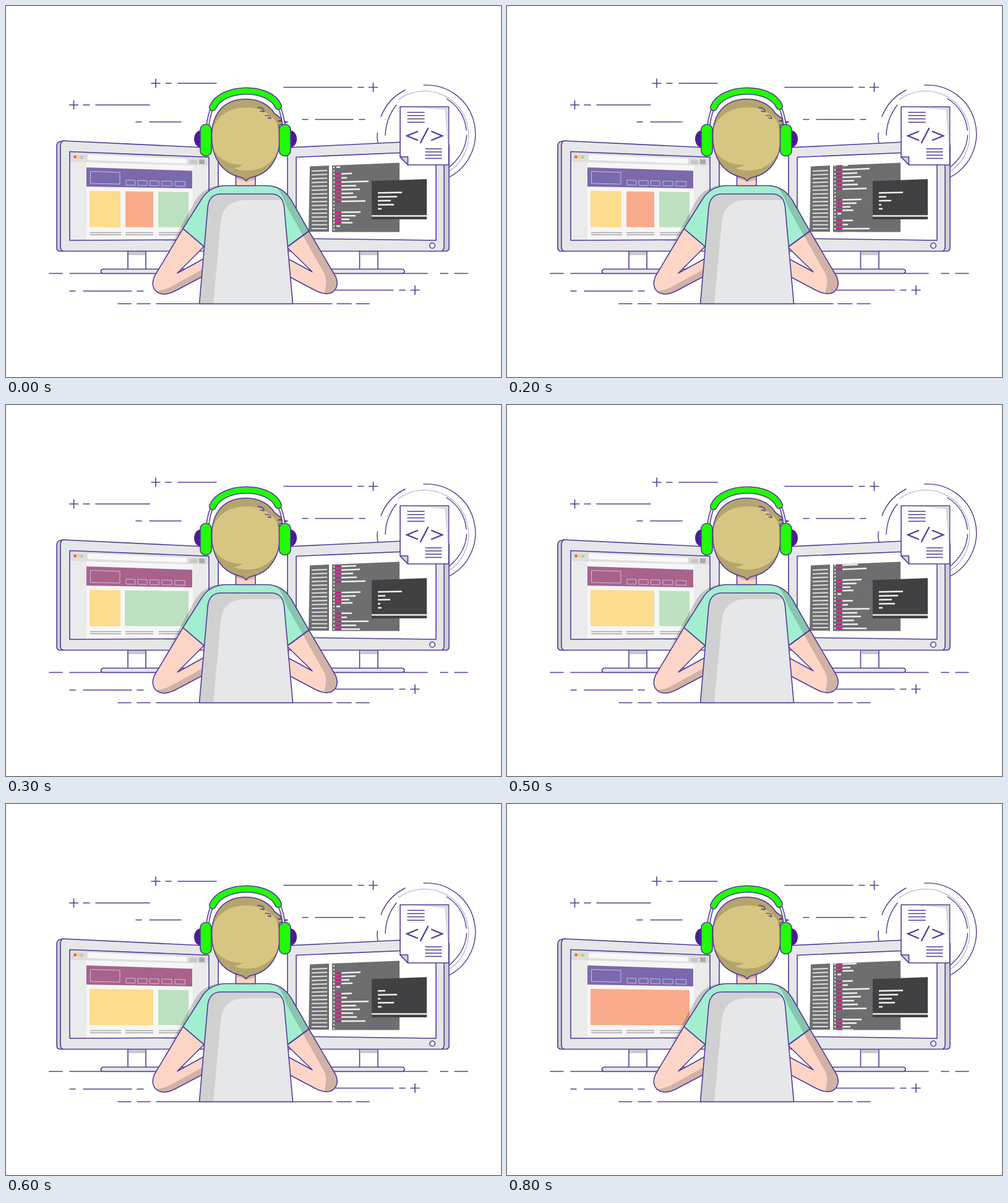
These frames come from a looping animation (800 px wide and 600 px high, 900 ms). An HTML page:

```html
<!DOCTYPE html>
<html lang="en">
<head>
<meta charset="utf-8">
<title>Developer at work</title>
<style>
  html, body { margin: 0; width: 100%; height: 100%; overflow: hidden; background: #fff; }
  svg { display: block; width: 100%; height: 100%; }
  .ink { stroke: #503c98; stroke-width: 1.6; stroke-linejoin: round; stroke-linecap: round; }
  .line { fill: none; }
  .case { fill: #e6e7e9; }
  .side { fill: #d0d0d5; }
  .skin { fill: #fcd5c7; }
  .shirt { fill: #a2eed0; }
  .green { fill: #22fb05; }
  .shade { fill: #000; fill-opacity: .17; }
</style>
</head>
<body>
<svg viewBox="0 0 800 600">
  <defs>
    <path id="leftArm" d="M286 360 240 437C233 453 240 465 255 466Q264 466 275 460L330 431V403L277 432 320 389Z"/>
    <path id="rightArm" d="M489.500 364 533 438C539 453 532 465 518 465.500Q509 465 498 459L445 431V403L495 430 454 390Z"/>
    <path id="torso" d="M286 360 315 314C324 298 338 290.500 357 290.500H420C439 290.500 452 299 461 314L489.500 364 454 390 440 375H335L320 389Z"/>
    <path id="chair" d="M312.500 481.500 326 326Q328 304 348 304H428Q447 304 449.500 325L463.500 481.500Z"/>
    <path id="head" d="M388 283Q385 278 377 276.500C348 269 332.500 244 332.500 211C332.500 173 353 150.500 388 150.500C411 150.500 427 162 434 174L447 184 440 186 455 187.500 441 193Q443 201 443 211C443 244 427 270 399 276.500Q391 278 388 283Z"/>
    <path id="band" d="M334 164C348 130 425 128 440 162"/>
    <path id="bandArms" d="M333 165Q328 177 326 193M442 165Q447 177 449 193"/>
    <clipPath id="screenClip"><path d="M103 235.500 328 244.500V378L103 379Z"/></clipPath>
    <clipPath id="codeClip"><path d="M527 258 636 253.500V365.500H527Z"/></clipPath>
    <clipPath id="headClip"><use href="#head"/></clipPath>
    <clipPath id="chairClip"><use href="#chair"/></clipPath>
    <clipPath id="bodyClip"><use href="#leftArm"/><use href="#rightArm"/><use href="#torso"/></clipPath>
  </defs>

  <!-- Backdrop -->
  <g class="ink line">
    <path d="M102.500 160h14M109.500 153v14M125 160h10M145 160h87
      M235 125h14M242 118v14M258 125h9M278 125h62M210 187.500h9M232 187.500h51
      M449 131.500h110M569 131.500h9M586.500 131.500h14M593.500 124.500v14
      M479 183.500h9M500 183.500h61M571 183.500h9"/>
    <path d="M70 432.500h21M103 432.500H681M702 432.500h12M725 432.500h21
      M103 461h9M125 461h78M212 461h10M533 459.500h93M636 459.500h9M654 459.500h14M661 452.500v14
      M181 481.500h21M212 481.500h21M243 481.500h284M535 481.500h23M566 481.500h21"/>
    <g stroke-width="1.4">
      <path d="M675 128A79 79 0 0 1 716 277M601 221Q599 212 600.500 205M606 179Q617 150 645 136"/>
      <path d="M613 209Q614 181 631 160M712 150A66 66 0 0 1 744 201M744.500 209Q743 238 716 261"/>
      <path d="M635 151A71 71 0 1 1 716 267.600" stroke-width="1.2" stroke-dasharray=".1 2.400"/>
    </g>
  </g>

  <!-- Left monitor -->
  <g class="ink">
    <path fill="#fff" d="M197 394h29v34h-29Z"/>
    <path d="M198 397h27v6h-27Z" fill="#c9c9cd" stroke="none"/>
    <path class="case" d="M157 425.500H300V432.500H157Q153 432 153.500 429Q154 426 157 425.500Z"/>
    <path class="side" d="M93 218 86 219.500Q82 221 82 227V391Q82 396 87 396.500H93Z"/>
    <path class="case" d="M92 218 343 230V396.500H92Q88 395 88 389V226Q88 220 92 218Z"/>
  </g>
  <g clip-path="url(#screenClip)">
    <path fill="#ebebec" d="M103 235H329V380H103Z"/>
    <path fill="#f6f6f6" d="M130 253 302 258V379H130Z"/>
    <path fill="#dededf" d="M103 235.500 328 244.500V258L103 252Z"/>
    <path fill="#f8f8f8" d="M132 240 292 247V255L132 249Z"/>
    <path fill="#c6c6c6" d="M297 249 309 249.500V256L297 255.500Z"/>
    <path fill="#a8a8a8" d="M312 248 321 248.500V256L312 255.500Z"/>
    <circle cx="111.500" cy="244" r="2.500" fill="#f0645c"/>
    <circle cx="117" cy="244.200" r="2.500" fill="#fbd35b"/>
    <circle cx="122.500" cy="244.500" r="2.500" fill="#a9d3a0"/>
    <path id="banner" d="M130 261 301 266.500V295L130 292Z"/>
    <path fill="none" stroke="#cabfe0" d="M136.500 267.500 184 269V288L136.500 287Z
      M194 281.500 208.500 282V290L194 289.500ZM213 282 228 282.400V290.400L213 290Z
      M232.500 282.500 247 283V290.800L232.500 290.400ZM252 283 268 283.500V291L252 290.700Z
      M273 283.500 289.500 284V291.500L273 291Z"/>
    <g id="cards"></g>
    <path stroke="#a5a5a5" stroke-width="1.700" d="M136 366.500h50M136 370h50M193 366.500h45M193 370h45M247 366.500h48M247 370h48"/>
  </g>
  <path class="ink line" d="M103 235.500 328 244.500V378L103 379Z"/>

  <!-- Right monitor -->
  <g class="ink">
    <path fill="#fff" d="M571.500 394H601V428H571.500Z"/>
    <path d="M572.500 397H600V403H572.500Z" fill="#c9c9cd" stroke="none"/>
    <path class="case" d="M500 425.500H640Q644 426 644 429Q644 432 640 432.500H500Z"/>
    <path class="side" d="M704 217 711 219Q716 221 716 227V391Q716 396 711 396.500H704Z"/>
    <path class="case" d="M455 229 704 217Q708 219 708 225V389Q708 395 704 396.500H455Z"/>
    <path fill="#fff" d="M469 244.500 695 235V379L469 376Z"/>
    <circle cx="689" cy="387.500" r="4.300" fill="#fff"/>
  </g>
  <path fill="#6d6e70" d="M491 259.500 522 258V365H489ZM527 258 636 253.500V365.500H527Z"/>
  <path id="fileList" stroke="#dcdcdc" stroke-width="2.100"/>
  <g id="code" clip-path="url(#codeClip)" stroke-width="2.500"></g>
  <path fill="#414042" d="M591 283 680 280V345H591Z"/>
  <path stroke="#eee" stroke-width="2.300" d="M591 339.500H680"/>
  <path id="terminal" stroke="#f0f0f0" stroke-width="2.500"/>

  <!-- Document -->
  <g class="ink">
    <path fill="#fff" d="M637 163H715.500V257H650L637 244Z"/>
    <path fill="#dcdcde" stroke="none" d="M660 164H714.700V238L709 168Z"/>
    <path fill="#cfcfd8" d="M637 244H649.500V257Z"/>
    <path class="line" d="M649 172h27M649 177.300h27M649 182.600h27M649 188h27
      M678 231h26M678 236h26M678 241.200h26M678 246.500h26" stroke-width="1.500"/>
    <path class="line" stroke-width="2.300" stroke-linejoin="miter" d="M665 203 648 210 665 217M682 198 670 221M688 203 705 210 688 217"/>
  </g>

  <!-- Body -->
  <path class="shade" d="M352 290C326 290 313 302 303 320L264 391 286 360 318 312C326 299 337 292 352 290Z"/>
  <g class="skin"><use href="#leftArm"/><use href="#rightArm"/></g>
  <use href="#torso" class="shirt"/>
  <g clip-path="url(#bodyClip)" class="shade">
    <path d="M239 461Q254 462 272 451L332 418V470H239Z"/>
    <path d="M430 290C446 297 448 313 456 329L514 432Q521 445 513 467H545V430L455 290Z"/>
  </g>
  <g class="ink line"><use href="#leftArm"/><use href="#rightArm"/><use href="#torso"/></g>
  <path class="ink skin" d="M371.500 270H403V290.500H371.500Z"/>
  <path class="shade" d="M372.300 270H402V281L388 284 372.300 279Z"/>

  <!-- Chair -->
  <use href="#chair" class="case"/>
  <path clip-path="url(#chairClip)" fill="#d0d0d1" d="M312 481.500 324 303H450V314H384Q350 316 347 350L335 481.500Z"/>
  <use href="#chair" class="ink line"/>

  <!-- Head and headphones -->
  <use href="#head" fill="#b4a56e"/>
  <path clip-path="url(#headClip)" fill="#d7c681" d="M332 205C338 178 361 164 389 164C412 164 430 175 438 190L444 224C436 252 414 267 388 266Q376 266 369 262Q377 261 383 257C357 257 340 246 332 224Z"/>
  <g class="ink line">
    <use href="#head"/>
    <path stroke-width="1.300" d="M407 164Q417 164 417 171L411 170M419 177Q428 176 428 182L423 181"/>
    <use href="#bandArms" stroke-width="5.600"/>
    <use href="#bandArms" stroke-width="2.600" stroke="#e6e7e9"/>
    <use href="#band" stroke-width="12.200"/>
    <use href="#band" stroke-width="9" stroke="#22fb05"/>
  </g>
  <path fill="#4b1d95" d="M316 201C300 201 300 229 316 229ZM458 201C474 201 474 229 458 229Z"/>
  <g class="ink green">
    <rect x="314" y="191.500" width="18" height="51" rx="8.500"/>
    <rect x="441.500" y="191.500" width="18.500" height="51" rx="8.500"/>
  </g>
</svg>
<script>
  const byId = id => document.getElementById(id);
  const PURPLE = '#7b69ad', MAUVE = '#a9628a';
  const YELLOW = '#fddc8e', ORANGE = '#f8ab8b', GREEN = '#bde1c0';

  // Page designs: banner colour, then cards as [left, right, fill]
  const pages = [
    [PURPLE, [135, 185, YELLOW], [193, 238, ORANGE], [246, 295, GREEN]],
    [MAUVE, [135, 185, YELLOW], [192, 295, GREEN]],
    [MAUVE, [135, 238, YELLOW], [246, 295, GREEN]],
    [PURPLE, [135, 295, ORANGE]]
  ];
  const pageAt = [0, 0, 0, 1, 1, 2, 2, 3, 3];

  const outputs = [[640, 632, 622, 627, 607], [640, 613, 621, 605, 607], [613, 632, 605, 627, 607]];
  const outputAt = [0, 0, 1, 1, 0, 0, 2, 2, 0];

  // Repeating code block: [offset, right end]; 0 is a blank line
  const rows = [
    [0, 559], [6.5, 551], [13.2, 586], [19.5, 566], [25.5, 572], [31.5, 561], [37.7, 567], [44.3, 581],
    [50, 0], [56, 0], [61.7, 573], [67.5, 565], [73.2, 555], [78.6, 560], [84, 540], [89.5, 0]
  ];
  const BLOCK = 95;

  // Lines flatten towards the bottom of the screen
  const strokeAt = (y, x1, x2) => {
    const slope = -.041 * (365 - y) / 107;
    return `M${x1} ${y + slope * (x1 - 527)}L${x2} ${y + slope * (x2 - 527)}`;
  };

  byId('fileList').setAttribute('d', Array.from({ length: 16 }, (_, i) => {
    const y = 267 + i * 6.2;
    return `M494 ${y}L519 ${y - (15 - i) * .07}`;
  }).join(''));

  function drawPage([banner, ...cards]) {
    byId('banner').setAttribute('fill', banner);
    const top = x => 299 + (x - 135) * .012;
    byId('cards').innerHTML = cards.map(([l, r, fill]) =>
      `<path fill="${fill}" d="M${l} ${top(l)}L${r} ${top(r)}V358L${l} 357.5Z"/>`).join('');
  }

  function drawCode(scroll) {
    let white = '', pink = '';
    for (let block = -1; block < 3; block++) {
      for (const [offset, end] of rows) {
        const y = 272 + block * BLOCK + offset - scroll;
        if (y < 250 || y > 370) continue;
        white += strokeAt(y, 529, 531);
        if (end === 540) white += strokeAt(y, 534, 540);
        else if (end) {
          pink += strokeAt(y, 533, 542);
          white += strokeAt(y, 542, end);
        }
      }
    }
    byId('code').innerHTML = `<path stroke="#efefef" d="${white}"/><path stroke="#df1288" d="${pink}"/>`;
  }

  function drawTerminal(ends) {
    byId('terminal').setAttribute('d', ends.map((end, i) => {
      const y = 302.3 + i * 6.4;
      return `M601 ${y}L${end} ${y - (end - 601) * .02 * (1 - i / 5)}`;
    }).join(''));
  }

  let shown = -1;
  function frame() {
    const step = Math.floor(performance.now() % 900 / 100);
    if (step !== shown) {
      shown = step;
      drawPage(pages[pageAt[step]]);
      drawCode(step * 10);
      drawTerminal(outputs[outputAt[step]]);
    }
    requestAnimationFrame(frame);
  }
  frame();
</script>
</body>
</html>
```
